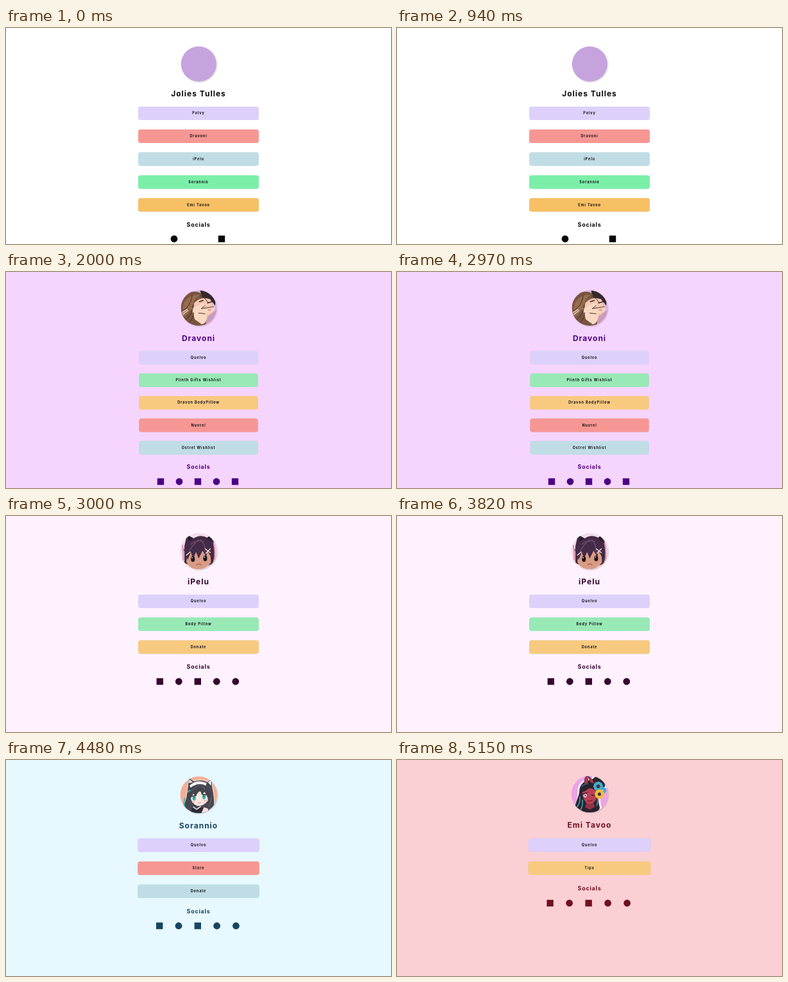
These frames come from a looping animation (600x338 px, 6000 ms). An HTML page:

```html
<!DOCTYPE html>
<html lang="en">
<head>
<meta charset="utf-8">
<title>Link pages</title>
<style>
  html, body { margin: 0; width: 100%; height: 100%; overflow: hidden; background: #fff; }
  svg { display: block; width: 100vw; height: 100vh; }
  text { font-family: Inter, "Open Sans", sans-serif; font-weight: 700; text-anchor: middle; }
  .title { font-size: 12px; letter-spacing: 1px; }
  .label { font-size: 9px; letter-spacing: .72px; }
  .link { font-size: 5.6px; letter-spacing: .85px; fill: #141218; }
  .bar { filter: drop-shadow(0 .5px .6px rgba(0, 0, 0, .1)); }
  .disc { filter: drop-shadow(1px 1.6px 1.2px rgba(0, 0, 0, .24)); }
  .page { opacity: 0; animation: turn 6s step-end infinite; }
  @keyframes turn {
    0% { opacity: 1; }
    16.6666%, 100% { opacity: 0; }
  }
</style>
</head>
<body>
<svg id="stage" viewBox="0 0 600 338">
  <defs>
    <clipPath id="round"><circle r="28"/></clipPath>

    <g id="emblem"><circle r="28" fill="#c6a3de"/></g>

    <g id="blonde" stroke-linecap="round">
      <rect x="-28" y="-28" width="56" height="56" fill="#eadfd5"/>
      <path d="M-23-12Q-8-23 3-21Q21-19 25-7L21 13Q9 27-2 26Q-18 20-23-12" fill="#f8d5cb"/>
      <ellipse cx="-14" cy="3" rx="8" ry="5" fill="#f6b9b6"/>
      <ellipse cx="13" cy="6" rx="7" ry="5" fill="#f6bcb3"/>
      <path d="M-28-28H28V-10Q18-17 8-23Q7-15 3-12Q2-19-3-24Q-10-13-21-9Q-23 8-28 15Z" fill="#e9ddd0"/>
      <path d="M-20-12Q-7-15-3-25M-4-25Q2-20 4-12M5-24Q16-16 24-13M-23-6Q-23 12-16 22" fill="none" stroke="#9c8980" stroke-width=".8"/>
      <ellipse cx="-13" cy="-11" rx="5.3" ry="4" fill="#48b9cd"/>
      <ellipse cx="17" cy="-7" rx="5.2" ry="3.7" fill="#efa91f"/>
      <path d="M-25-15Q-15-17-7-11M10-8Q17-13 26-8" fill="none" stroke="#34201f" stroke-width="1.8"/>
      <circle cx="-12" cy="-11" r="1.5" fill="#1c6980"/><circle cx="17" cy="-7" r="1.4" fill="#8c5511"/>
      <path d="M-10 9Q-6 12-2 9Q2 12 7 8" fill="none" stroke="#974f50" stroke-width="1"/>
      <path d="M-5 11Q-1 14 3 11" fill="#fff" stroke="#5aaaa9" stroke-width=".7"/>
      <path d="M28 1L19 5L11 13L10 23L18 28H28Z" fill="#f6d5c9"/>
      <path d="M11 16L21 4M16 18L25 7M18 5L24 16" fill="none" stroke="#a47670" stroke-width=".8"/>
      <path d="M20 7L24 13M14 9L17 14" stroke="#58afb5" stroke-width="1.3"/>
    </g>

    <g id="brown" stroke-linecap="round">
      <rect x="-28" y="-28" width="56" height="56" fill="#d8b7dd"/>
      <path d="M-28-15Q-17-29 0-25Q14-21 16-7L11 28H-28Z" fill="#785440"/>
      <path d="M2-28H24Q28-17 26-4Q19-15 6-17Z" fill="#35282a"/>
      <path d="M-7-8Q3-19 18-14Q24-5 22 9Q16 20 5 19L-9 8Z" fill="#f5c9b2"/>
      <path d="M-11 1L7-8Q12-8 10-4L4 1L23-2Q27 1 23 5L11 9Q16 22 5 26L-6 18Z" fill="#f9d8c1"/>
      <path d="M-24-7Q-15-23 3-21Q-8-16-9-3Q-19 14-27 15" fill="#956c50"/>
      <path d="M-25 4Q-13-2-10-20M-21 19Q-8 9-9-5M-17 25Q-7 16-8 7M2-20Q11-16 15-8M10-4L4 1L23-2M0 8L10 9" fill="none" stroke="#453029" stroke-width="1"/>
      <path d="M1-10L7-12M14-8L21-10" stroke="#3b2428" stroke-width="1.7"/>
      <path d="M-26 7L-18 2M-25 10L-17 4" stroke="#eee2d8" stroke-width="1.2"/>
      <path d="M14 13L28 3V24L11 28Z" fill="#c99bbb"/>
      <ellipse cx="17" cy="3" rx="3" ry="1.8" fill="#ee9d94"/>
    </g>

    <g id="plum" stroke-linecap="round">
      <rect x="-28" y="-28" width="56" height="56" fill="#f0dce7"/>
      <path d="M-22-8L-18-26L-8-20Q3-27 13-21L22-27L25 4L22 19Q1 29-22 18Z" fill="#432941"/>
      <path d="M-18-25L-8-20L-14-14M13-21L20-26L19-15" fill="#291a2d"/>
      <path d="M-17 2Q-2-8 18 1L19 17Q12 28-2 28Q-15 27-19 16Z" fill="#d99b84"/>
      <path d="M-23-2Q-16-21 0-21Q17-21 23-1L19 9L13-2L12 9L6-1L0 11L-4 1L-9 12L-12 1L-17 13Z" fill="#442b48"/>
      <path d="M-12-11Q-3-18 8-15M-15 0Q-7-13 0-18M10 0Q10-11 3-18" fill="none" stroke="#71506f" stroke-width="1.2"/>
      <ellipse cx="-9" cy="12" rx="3" ry="4.3" fill="#17131a"/><ellipse cx="10" cy="11" rx="3" ry="4.3" fill="#17131a"/>
      <circle cx="-10" cy="10" r=".8" fill="#fff"/><circle cx="9" cy="9" r=".8" fill="#fff"/>
      <path d="M10-4L18 2M11 3L18-4M-19 6L-13 1" stroke="#f3d7d7" stroke-width="1.4"/>
      <path d="M-3 21Q0 18 4 21" fill="none" stroke="#88453f" stroke-width="1"/>
      <path d="M-25-9Q-23 5-24 16M23-13Q26 0 24 15" fill="none" stroke="#db8ba7" stroke-width="2"/>
    </g>

    <g id="maid" stroke-linecap="round">
      <rect x="-28" y="-28" width="56" height="56" fill="#f6ae95"/>
      <path d="M-17-10L-15-27L-7-21Q5-25 13-20L20-26L21-11Q24 2 24 17L15 24L-12 28L-25 20Q-18 6-17-10" fill="#484852" stroke="#f3e9e8" stroke-width="1"/>
      <path d="M-15-18L-14-24L-9-19M14-19L19-23L19-14" fill="#f3edee"/>
      <path d="M-14-14Q-3-25 12-18L11-14Q-1-20-12-11Z" fill="#f8f4f5"/>
      <path d="M-13 0Q1-9 14-2L14 9Q8 17-1 17Q-12 14-13 0" fill="#fbe6e1"/>
      <path d="M-18 0Q-15-14 0-15Q14-14 18-1L15 7L9-5L5 0L2-7L-5 2L-8-2L-14 9Z" fill="#43434d"/>
      <path d="M-12-5Q-5-13 1-14M10-7Q8-12 3-14M19 4Q19 12 15 18" fill="none" stroke="#777781" stroke-width=".9"/>
      <ellipse cx="-7" cy="5" rx="2.6" ry="3.8" fill="#48b5a9"/><ellipse cx="8" cy="3" rx="2.6" ry="3.8" fill="#48b5a9"/>
      <path d="M-10 2L-4 1M5-1L11 0" stroke="#252a31" stroke-width="1.3"/>
      <circle cx="-7" cy="4.5" r="1.1" fill="#175d60"/><circle cx="8" cy="2.5" r="1.1" fill="#175d60"/>
      <path d="M-1 12Q1 13.5 3 12" fill="none" stroke="#a46463" stroke-width=".8"/>
      <ellipse cx="-8" cy="11" rx="2.5" ry="1.3" fill="#f4b8b7"/><ellipse cx="10" cy="9" rx="2.5" ry="1.3" fill="#f4b8b7"/>
      <path d="M-21 5Q-24 15-20 21M-17-4L-13-7" fill="none" stroke="#4eb3a5" stroke-width="1.8"/>
      <path d="M-14 28L-9 19L-3 22L4 18L11 28Z" fill="#292c36"/>
      <path d="M-8 19L-3 22L3 18" fill="none" stroke="#f2e9ec" stroke-width="1.4"/>
      <path d="M4 28L8 19L14 21L15 28" fill="#f7dce0"/>
    </g>

    <g id="crimson" stroke-linecap="round">
      <rect x="-28" y="-28" width="56" height="56" fill="#eda2e6"/>
      <path d="M-17-8Q-14-22 2-23L8-28H23L25-12L15 1Q14 12 17 21L14 28H-14L-24 22Q-16 8-17-8" fill="#29262f" stroke="#fbeaf9" stroke-width="3"/>
      <path d="M-8-16Q-9-23-5-28Q-2-23-2-16M2-17Q-1-24-4-28Q4-25 7-17" fill="#b4384c" stroke="#29222c" stroke-width=".7"/>
      <path d="M-12-5Q0-13 10-5L10 7Q6 15-1 16Q-10 12-12-5" fill="#bb4154"/>
      <path d="M-16-1Q-15-17 0-18Q12-16 13-4Q5-7 1-12Q-4-5-12-3L-14 11Q-16 22-24 22Z" fill="#26242e"/>
      <path d="M-15 4Q-14 15-21 21M-11 9Q-10 18-14 24M12-2Q13 9 11 17" fill="none" stroke="#3f8da8" stroke-width="1.8"/>
      <path d="M-12-12Q-8-16-3-16" fill="none" stroke="#55758b" stroke-width="1.2"/>
      <ellipse cx="-7" cy="2" rx="2.6" ry="3" fill="#f1dce9"/><circle cx="-6.8" cy="2" r="1.5" fill="#7d57a2"/>
      <path d="M-11 0L-4-2M3 1Q6 3 9 0" fill="none" stroke="#2b1725" stroke-width="1.3"/>
      <path d="M-3 10Q0 12 4 9" fill="none" stroke="#6b1c30" stroke-width="1.2"/>
      <path d="M-5 14L-7 20L0 24L8 19L5 12L0 16Z" fill="#963248"/>
      <path d="M-14 28L-8 20L0 24L9 19L14 28Z" fill="#2a222e"/>
      <g fill="none" stroke-width="4.5" stroke-dasharray="2.6 .7">
        <circle cx="13" cy="-12" r="5" stroke="#44aaca"/><circle cx="20" cy="-6" r="3" stroke="#44aaca"/><circle cx="15" cy="0" r="5" stroke="#efbd3a"/>
      </g>
      <circle cx="13" cy="-12" r="2.5" fill="#49313a"/><circle cx="15" cy="0" r="2.5" fill="#49313a"/>
    </g>
  </defs>
</svg>
<script>
const C = { lilac: '#ddd1fb', red: '#f79793', blue: '#c0dde6', mint: '#98e9b6', green: '#7befa8', amber: '#f8ca80', gold: '#f7c064' };

// face: [id, centre y, radius]; bars: [width, first centre y, pitch]; foot: [label y, icon y]
const pages = [
  { title: 'Jolies Tulles', ty: 102.8, bg: '#fff', ink: '#080808', face: ['emblem', 56.3, 27.6],
    bars: [188, 133.5, 35.85], foot: [307.4, 330], icons: 'os', span: [262, 74],
    links: [['Polvy', 'lilac'], ['Dravoni', 'red'], ['iPelu', 'blue'], ['Sorannio', 'green'], ['Emi Tavoo', 'gold']] },
  { title: 'Polvy', ty: 102.8, bg: '#fcdcf5', ink: '#800075', face: ['blonde', 55.3, 28.4],
    bars: [188, 133.5, 35.8], foot: [200, 223], icons: 'sosoo', span: [239.5, 29.6],
    links: [['Quelvo', 'lilac'], ['Donate', 'amber']] },
  { title: 'Dravoni', ty: 103.8, bg: '#f5d5fd', ink: '#4c0085', face: ['brown', 56.4, 27.7],
    bars: [185.4, 134, 35.3], foot: [305.2, 328], icons: 'sosos', span: [241, 29],
    links: [['Quelvo', 'lilac'], ['Plinth Gifts Wishlist', 'mint'], ['Dravon BodyPillow', 'amber'], ['Nuvrel', 'red'], ['Ostrel Wishlist', 'blue']] },
  { title: 'iPelu', ty: 102.8, bg: '#fdf2fe', ink: '#37062f', face: ['plum', 55.3, 28.3],
    bars: [188, 133.5, 35.8], foot: [236, 259], icons: 'sosoo', span: [239.8, 29.5],
    links: [['Quelvo', 'lilac'], ['Body Pillow', 'mint'], ['Donate', 'amber']] },
  { title: 'Sorannio', ty: 102.3, bg: '#e7f8ff', ink: '#154661', face: ['maid', 54.5, 28.7],
    bars: [189.6, 133.3, 36], foot: [236.5, 259.5], icons: 'sosoo', span: [239.2, 29.8],
    links: [['Quelvo', 'lilac'], ['Store', 'red'], ['Donate', 'blue']] },
  { title: 'Emi Tavoo', ty: 101.8, bg: '#fbd0d5', ink: '#701020', face: ['crimson', 53.5, 28.6],
    bars: [191, 133.2, 36.1], foot: [200.5, 224], icons: 'sosoo', span: [238.6, 30],
    links: [['Quelvo', 'lilac'], ['Tips', 'amber']] }
];

const text = (cls, y, size, str) => `<text class="${cls}" x="300" y="${y + size * .36}">${str}</text>`;

const bar = ([w, y0, step], [name, color], i) => {
  const y = y0 + i * step;
  return `<rect class="bar" x="${300 - w / 2}" y="${y - 10.6}" width="${w}" height="21.2" rx="4" fill="${C[color]}"/>`
    + text('link', y - .2, 5.6, name);
};

const icon = (kind, x, y) => kind === 'o'
  ? `<circle cx="${x}" cy="${y}" r="5.4"/>`
  : `<rect x="${x - 5.2}" y="${y - 5.2}" width="10.4" height="10.4"/>`;

const page = (p, n) => {
  const [id, cy, r] = p.face, [x0, gap] = p.span;
  return `<g class="page" style="animation-delay:${n ? n - pages.length : 0}s" fill="${p.ink}">
    <rect width="600" height="338" fill="${p.bg}"/>
    <circle class="disc" cx="300.3" cy="${cy}" r="${r - .3}" fill="#eee"/>
    <g transform="translate(300.3 ${cy}) scale(${r / 28})" clip-path="url(#round)"><use href="#${id}"/></g>
    ${text('title', p.ty, 12, p.title)}
    ${p.links.map((link, i) => bar(p.bars, link, i)).join('')}
    ${text('label', p.foot[0], 9, 'Socials')}
    ${[...p.icons].map((k, i) => icon(k, x0 + i * gap, p.foot[1])).join('')}
  </g>`;
};

document.getElementById('stage').insertAdjacentHTML('beforeend', pages.map(page).join(''));
</script>
</body>
</html>
```
